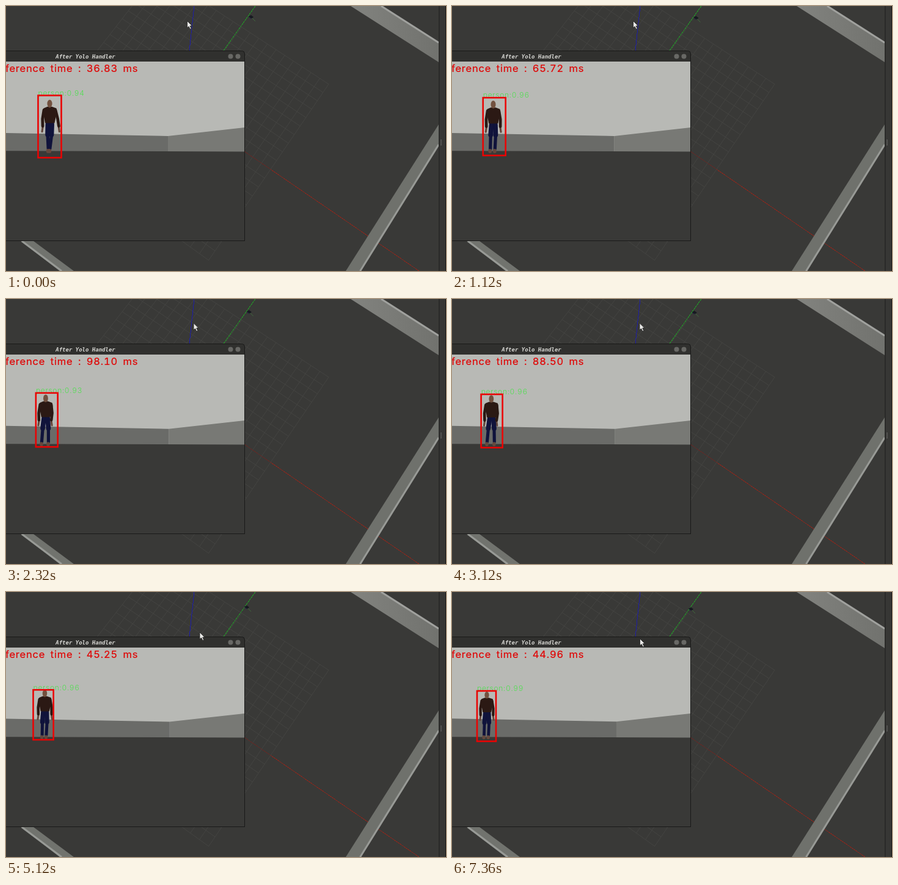
Animation of 720 by 434 pixels, one loop 7440 ms. Source, as an HTML page:

```html
<!DOCTYPE html>
<html lang="en">
<head>
<meta charset="utf-8">
<title>Person detection</title>
<style>
  html, body { margin: 0; width: 100%; height: 100%; overflow: hidden; background: #393937; }
  svg { display: block; }
  .title { font: italic bold 9px "DejaVu Sans Mono", monospace; fill: #d6d6d2; text-anchor: middle; }
  .timing, .label { font-family: Inter, sans-serif; font-variant-numeric: tabular-nums; }
  .timing { font-size: 16.5px; letter-spacing: .8px; word-spacing: 3.3px;
    fill: #e00404; stroke: #e00404; stroke-width: .2px; }
  .label { font-size: 12px; font-weight: 300; letter-spacing: .7px; fill: #50df50; }
  .axis { shape-rendering: crispEdges; }
  .limb { fill: none; stroke-linejoin: round; stroke-linecap: round; }
  .sleeve { stroke: #291813; stroke-width: 4.8; }
  .hand { stroke: #62463b; stroke-width: 3.2; }
  .thigh { stroke: #10133b; stroke-width: 8; }
  .shin { stroke: #10133b; stroke-width: 5.4; }
  .foot { fill: #65493e; }
</style>
</head>
<body>
<svg width="720" height="434" viewBox="0 0 720 434">
  <defs>
    <linearGradient id="far" x2="1" y2="0">
      <stop stop-color="#82837f"/><stop offset="1" stop-color="#71726e"/>
    </linearGradient>
    <clipPath id="view"><rect y="91" width="390" height="293"/></clipPath>
  </defs>

  <rect width="720" height="434" fill="#393937"/>
  <path id="grid" fill="none" stroke="#474745" stroke-width=".8"/>
  <g class="axis">
    <path d="M390 238L433 267.5" stroke="#5f2a27"/>
    <path d="M433 267.5L676 434" stroke="#86281f"/>
    <path d="M408 0L356 73" stroke="#258f29"/>
    <path d="M308 0L300 73" stroke="#1d1da8"/>
  </g>

  <path d="M564 0H614L708 60V92Z" fill="url(#far)"/>
  <path d="M614 0L708 60" stroke="#a0a19e" stroke-width="3"/>
  <path d="M708 194V229L581 434H556Z" fill="#6f716c"/>
  <path d="M708 227L579.5 434" stroke="#989a96" stroke-width="3"/>
  <path d="M24 385H45L111 434H88Z" fill="#71736e"/>
  <path d="M26 385L91 434" stroke="#989a96" stroke-width="3"/>

  <rect x="708" width="12" height="434" fill="#373735"/>
  <rect x="708" width="1.5" height="434" fill="#262625"/>
  <rect x="719" width="1" height="434" fill="#121212"/>
  <path d="M712 219V228" stroke="#6b6b69" stroke-width="2" stroke-dasharray="1 1"/>

  <g id="robot">
    <path d="M1 1L7 7" stroke="#3f6a3c"/>
    <path d="M-4 -1L0 -3L4 0L2 2L-2 2Z" fill="#171a20"/>
    <path d="M-3 0L0 3" stroke="#25244f"/>
  </g>

  <path d="M0 73H385Q391 73 391 79V385H0Z" fill="#191918"/>
  <path d="M0 74H385Q390 74 390 79V91H0Z" fill="#30302e"/>
  <text class="title" x="130" y="85.7">After Yolo Handler</text>
  <circle cx="367.5" cy="82.5" r="4" fill="#686865"/>
  <circle cx="379.5" cy="82.5" r="4" fill="#686865"/>

  <g clip-path="url(#view)">
    <rect y="91" width="390" height="148" fill="#b8b9b5"/>
    <path id="backWall" fill="#6a6b68"/>
    <path id="sideWall" fill="#787975"/>
    <path d="M0 237.3L390 238.4V384H0Z" fill="#393937"/>
    <g id="person">
      <path id="handL" class="limb hand"/><path id="handR" class="limb hand"/>
      <path id="thighL" class="limb thigh"/><path id="thighR" class="limb thigh"/>
      <path id="shinL" class="limb shin"/><path id="shinR" class="limb shin"/>
      <ellipse id="footL" class="foot" rx="3" ry="3.6"/>
      <ellipse id="footR" class="foot" rx="3" ry="3.6"/>
      <path id="armL" class="limb sleeve"/><path id="armR" class="limb sleeve"/>
      <path d="M-4 12H4L11 14.5L12 20L8 39H-7.5L-11 20L-10 14.5Z" fill="#2b1914"/>
      <ellipse cy="7" rx="4.1" ry="6.5" fill="#72513f"/>
    </g>
    <text class="label" id="label"></text>
    <rect id="box" fill="none" stroke="#ea0303" stroke-width="2.6"/>
    <text class="timing" id="timing" x="-1" y="108"></text>
  </g>

  <path id="cursor" d="M0 0V11.3L2.6 9L4.8 13.4L6.8 12.4L4.7 8.2L8 8Z"
    fill="#e9e9e7" stroke="#1c1c1c" stroke-width=".8"/>
</svg>
<script>
const LOOP = 7440, STEP = 80, STRIDE = 890, GLIDE = 400;
const pause = { from: 5120, to: 5840 };

// time, inference ms, confidence
const readings = [[0, 36.83, .94], [1120, 65.72, .96], [2320, 98.10, .93], [4000, 45.97, .97],
  [5120, 45.25, .96], [6320, 56.45, .95], [7360, 44.96, .99]];

// departure time and resting place of the pointer
const stops = [[0, 296.5, 24.5], [1680, 307, 39.5], [4320, 317, 66], [5840, 314.5, 76], [6560, 307.5, 76.5]];

const el = id => document.getElementById(id);
const set = (id, attrs) => {
  for (const k in attrs) el(id).setAttribute(k, attrs[k]);
};
const mix = (a, b, f) => a + (b - a) * f;
const wave = turns => Math.cos(turns * Math.PI * 2);

function random(n) {
  const x = Math.sin(n * 12.9898 + 4.1) * 43758.5453;
  return x - Math.floor(x);
}

function project(u, v) {
  const w = 1 - .022 * u + .032 * v;
  const x = (288.2 + 135.3 * u + 109.8 * v) / w, y = (168 + 93.6 * u - 132.3 * v) / w;
  return x.toFixed(1) + " " + y.toFixed(1);
}

function drawGrid() {
  let d = "";
  for (let i = -10; i <= 10; i++) {
    const k = i / 10;
    d += `M${project(k, -1)}L${project(k, 1)}M${project(-1, k)}L${project(1, k)}`;
  }
  set("grid", { d });
}

function arm(side, dir, wrist) {
  const elbow = dir * 12 + (wrist - dir * 12) * .4;
  set("arm" + side, { d: `M${dir * 9.5} 17.5L${elbow} 32L${wrist} 44` });
  set("hand" + side, { d: `M${wrist} 46L${wrist + dir} 53` });
}

function leg(side, hip, x) {
  const knee = mix(hip, x, .4) + hip * .2;
  set("thigh" + side, { d: `M${hip} 41L${knee} 58` });
  set("shin" + side, { d: `M${knee} 60L${x} 81` });
  set("foot" + side, { cx: x - .5, cy: 85 });
}

function drawPerson(t, p) {
  const x = mix(71.5, 57, p) - 2.2 * Math.sin(p * Math.PI * 2), y = mix(153, 162.5, p);
  const gait = wave(t / STRIDE), spread = 3.75 - 2.5 * gait;
  set("person", { transform: `translate(${x} ${y}) scale(${(241.5 - y) / 89})` });
  arm("L", -1, -11.5);
  arm("R", 1, 12 + 3 * gait);
  leg("L", -3, -1 - spread);
  leg("R", 3.5, -1 + spread);
}

function drawDetection(t, p) {
  const left = mix(52.5, 41, p), right = mix(90.5, 72, p);
  const top = 146.5 + 15.5 * Math.sin(p * Math.PI / 2);
  const bottom = mix(246, 242, p) + 2.5 * wave((t - 4000) / 672);
  set("box", { x: left, y: top, width: right - left, height: bottom - top });
  set("label", { x: left, y: top + .3 });

  const i = Math.min(readings.findLastIndex(r => r[0] <= t), readings.length - 2);
  const [t0, ms0, score0] = readings[i], [t1, ms1, score1] = readings[i + 1];
  const f = (t - t0) / (t1 - t0);
  const noise = Math.sin(f * Math.PI) * (random(t) - .5);
  el("label").textContent = "person:" + (mix(score0, score1, f) + .04 * noise).toFixed(2);
  el("timing").textContent = `ference time : ${(mix(ms0, ms1, f) + 40 * noise).toFixed(2)} ms`;
}

function drawRoom(p) {
  const corner = mix(265, 269, p), lift = mix(0, -.8, p);
  set("backWall", { d: `M0 ${208 + lift}L${corner} ${213 + lift}V239H0Z` });
  set("sideWall", { d: `M${corner} ${213 + lift}L390 199V239H${corner}Z` });
}

function drawPointer(t) {
  const i = stops.findLastIndex(s => s[0] <= t);
  const [start, x, y] = stops[i], [, fromX, fromY] = stops[Math.max(0, i - 1)];
  const f = Math.min(1, (t - start) / GLIDE);
  set("cursor", { transform: `translate(${mix(fromX, x, f)} ${mix(fromY, y, f)})` });
}

function draw(now) {
  let t = Math.floor(now % LOOP / STEP) * STEP;
  if (t > pause.from && t < pause.to) t = pause.from;
  const p = t / (LOOP - STEP);
  drawRoom(p);
  drawPerson(t, p);
  drawDetection(t, p);
  drawPointer(t);
  set("robot", { transform: `translate(${mix(401, 391, p)} ${mix(18, 28, p)})` });
}

drawGrid();
const start = performance.now();
function tick() {
  draw(performance.now() - start);
  requestAnimationFrame(tick);
}
tick();
</script>
</body>
</html>
```
